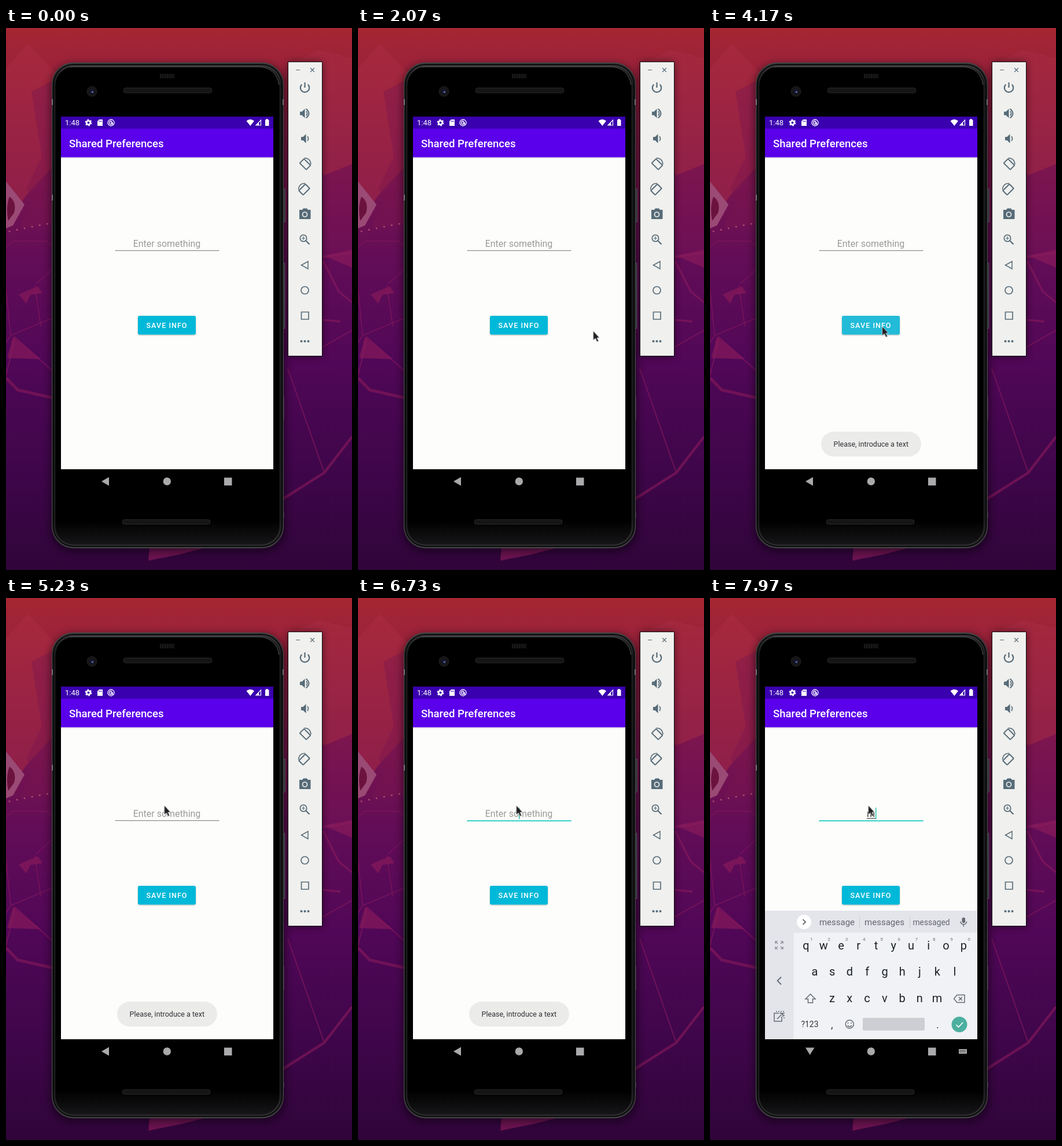
Write an HTML page that moves like this. It is 598 px wide and 936 px high and loops after 8 s.

```html
<!DOCTYPE html>
<html lang="en">
<head>
<meta charset="utf-8">
<title>Shared Preferences demo</title>
<style>
  html, body { margin: 0; width: 100%; height: 100%; overflow: hidden; background: #4e0a55; }
  svg { display: block; width: 100vw; height: 100vh; font-family: Roboto, sans-serif; }
  .mid { text-anchor: middle; }
  .line { fill: none; stroke: #8a1a5c; stroke-width: 2; opacity: .6; }
  .tools { fill: none; stroke: #566b78; stroke-width: 1.7; }
  .tools .solid { fill: #566b78; stroke: none; }
  .keys { font-size: 20px; fill: #1d2126; }
  .keys .digit { font-size: 8px; fill: #6c7078; }

  /* Every part shares one 8 s clock. */
  .clock { animation: 8s linear infinite both; }
  #pointer { animation-name: pointer; }
  #button { animation-name: button; }
  #ripple { animation-name: ripple; }
  #toast { animation-name: toast; }
  #focus { animation-name: focus; transform-origin: 278px 385px; }
  #caret { animation-name: caret; }
  #keyboard { animation-name: keyboard; }
  #hint { animation-name: hint; }
  .typed { animation-name: typed; }
  .idle { animation-name: idle; }
  .open { animation-name: open; }

  @keyframes pointer {
    0%, 20% { transform: translate(606px, 590px); animation-timing-function: ease-out; }
    25%, 28% { transform: translate(406.5px, 523px); animation-timing-function: ease-in-out; }
    36%, 53% { transform: translate(297.5px, 515px); animation-timing-function: ease-in-out; }
    62%, 100% { transform: translate(273.5px, 358px); }
  }
  @keyframes button {
    0%, 33.5% { fill: #00b8d8; }
    35%, 54% { fill: #20bbd8; }
    56%, 100% { fill: #00b8d8; }
  }
  @keyframes ripple {
    0%, 45% { opacity: 0; transform: scale(.1); }
    46% { opacity: .24; transform: scale(.3); }
    48% { opacity: .24; transform: scale(1); }
    51%, 100% { opacity: 0; transform: scale(1); }
  }
  @keyframes toast {
    0%, 47% { opacity: 0; }
    49%, 91% { opacity: 1; }
    93%, 100% { opacity: 0; }
  }
  @keyframes focus {
    0%, 81.5% { opacity: 0; transform: scaleX(.1); }
    83%, 100% { opacity: 1; transform: none; }
  }
  @keyframes caret {
    0% { opacity: 0; transform: none; animation-timing-function: step-end; }
    82% { opacity: 1; transform: none; animation-timing-function: step-end; }
    88.25% { opacity: 0; transform: none; animation-timing-function: step-end; }
    94.5% { opacity: 1; transform: none; animation-timing-function: step-end; }
    97%, 100% { opacity: 1; transform: translateX(8px); }
  }
  @keyframes keyboard {
    0%, 86% { transform: translateY(224px); animation-timing-function: cubic-bezier(0, 0, .2, 1); }
    90%, 100% { transform: none; }
  }
  @keyframes hint { 0%, 96.99% { opacity: 1; } 97%, 100% { opacity: 0; } }
  @keyframes typed { 0%, 96.99% { opacity: 0; } 97%, 100% { opacity: 1; } }
  @keyframes idle { 0%, 86.99% { opacity: 1; } 87%, 100% { opacity: 0; } }
  @keyframes open { 0%, 86.99% { opacity: 0; } 87%, 100% { opacity: 1; } }
</style>
</head>
<body>
<svg viewBox="0 0 598 936">
  <defs>
    <linearGradient id="wall" x2="0" y2="1">
      <stop offset="0" stop-color="#a62632"/>
      <stop offset=".1" stop-color="#98213e"/>
      <stop offset=".25" stop-color="#7e164c"/>
      <stop offset=".42" stop-color="#630d57"/>
      <stop offset=".62" stop-color="#500757"/>
      <stop offset=".8" stop-color="#40064b"/>
      <stop offset="1" stop-color="#30053a"/>
    </linearGradient>
    <linearGradient id="shell" x2="0" y2="1">
      <stop offset="0" stop-color="#3a3a3c"/>
      <stop offset=".05" stop-color="#191a1b"/>
      <stop offset=".94" stop-color="#191a1b"/>
      <stop offset="1" stop-color="#38383a"/>
    </linearGradient>
    <linearGradient id="glass" x2="0" y2="1">
      <stop offset=".95" stop-color="#000"/>
      <stop offset="1" stop-color="#161618"/>
    </linearGradient>
    <filter id="soft" x="-20%" y="-20%" width="140%" height="140%"><feGaussianBlur stdDeviation="7"/></filter>
    <filter id="lift" x="-10%" y="-10%" width="120%" height="140%">
      <feDropShadow dx="0" dy="1" stdDeviation=".9" flood-opacity=".3"/>
    </filter>
    <clipPath id="screen"><path d="M95 153h367v609H95z"/></clipPath>
    <clipPath id="buttonClip"><rect x="228" y="497" width="100" height="33" rx="3"/></clipPath>
  </defs>

  <!-- Wallpaper -->
  <path fill="url(#wall)" d="M0 0h598v936H0z"/>
  <path fill="#ac2c42" opacity=".5" d="M0 70 38 27 90 82V230L34 290 0 344z"/>
  <path fill="#78164f" opacity=".4" d="M44 110 90 86V338L22 346 44 302 36 276 62 222z"/>
  <path fill="#9a4a75" d="M0 265 32 305 12 341 0 346z"/>
  <path fill="#6b123f" d="M6 291q13 10 8 28L4 333Q-1 310 6 291z"/>
  <path fill="#a82c45" opacity=".5" d="M487 64 540 38 598 52V235L549 255 520 160z"/>
  <path fill="#7c1454" opacity=".35" d="M549 255 598 235V385L548 395z"/>
  <path fill="none" stroke="#a8456f" stroke-width="3.2" stroke-linecap="round" stroke-dasharray="0 13.3" d="M6 351 72 338"/>
  <g class="line">
    <path stroke-width="1.6" d="M0 378 12 368H70L82 379M0 452 8 531 82 500M8 531 0 544M50 445 60 515M82 415 52 442"/>
    <path stroke-width="5" d="M0 604 20 625 82 639"/>
    <path d="M0 600 16 534 82 594M487 588 550 768M520 566 598 522"/>
    <path d="M598 706 550 768 479 813" stroke-width="4.500"/>
    <path d="M548 396 598 388M548 402 575 455 598 474M548 504 578 507" stroke-width="3.500"/>
  </g>
  <path fill="#8a1b5b" opacity=".65" d="M22 460 55 446 63 458 42 461 35 476zM12 533 60 572 2 570zM248 898H344L300 909 246 920zM549 393 598 383V414z"/>

  <!-- Phone -->
  <rect x="77" y="62" width="406" height="842" rx="38" opacity=".5" filter="url(#soft)"/>
  <g fill="#37343a" stroke="#68636c" stroke-width=".8">
    <path d="M477 278h5.500v57H477zM477 406h5v113H477zM476 636h4v40h-4zM476 837h4v8h-4z"/>
  </g>
  <rect x="79.500" y="60" width="400" height="838" rx="37" fill="url(#shell)" stroke="#4b4c4c"/>
  <rect x="82" y="63" width="395" height="832" rx="35" fill="none" stroke="#0c0c0d" stroke-width="2"/>
  <rect x="85" y="67" width="388" height="825" rx="32" fill="url(#glass)" stroke="#1c1c1e"/>
  <path d="M110 67H440Q467 70 472 98" fill="none" stroke="#5c5d60"/>
  <path d="M80 123v10M80 288v10M479 123v10" stroke="#77787a" stroke-width="2"/>
  <path d="M266 83h25" stroke="#1d1d1d" stroke-width="8" stroke-dasharray="2 1"/>
  <g fill="#151515" stroke="#28282a">
    <rect x="203" y="103.500" width="153" height="8.500" rx="4"/>
    <rect x="201" y="849" width="152" height="8" rx="4"/>
  </g>
  <circle cx="148.500" cy="109.500" r="8.500" fill="#151517" stroke="#222225"/>
  <circle cx="148.500" cy="109.500" r="4" fill="#15172e"/>
  <circle cx="149.500" cy="110.500" r="1.600" fill="#6871b5"/>

  <!-- App -->
  <g clip-path="url(#screen)">
    <path fill="#fdfdfb" d="M95 153h367v609H95z"/>
    <path fill="#5a00ea" d="M95 174h367v49.500H95z"/>
    <path fill="#3a00af" d="M95 153h367v21H95z"/>
    <path fill="#d9d6e1" d="M95 223.500h367v1.500H95z"/>
    <g fill="#fff">
      <text x="102" y="168" font-size="13">1:48</text>
      <circle cx="142.500" cy="163.500" r="3.300" fill="none" stroke="#fff" stroke-width="2.600"/>
      <circle cx="142.500" cy="163.500" r="5" fill="none" stroke="#fff" stroke-width="2" stroke-dasharray="2.600 2.636"/>
      <path d="M161 158h6v11h-9v-8z"/>
      <path d="M161 160v2m2-2v2m2-2v2" stroke="#3a00af"/>
      <circle cx="181.500" cy="163.500" r="5.500" fill="none" stroke="#fff" stroke-width="1.300"/>
      <path d="M184.500 164A3 3 0 1 1 181.500 160.500L184.500 164M181 163l4 4" fill="none" stroke="#fff" stroke-width="1.300"/>
      <path d="M415.500 160.500Q422 155 429 160.500L422.300 169z"/>
      <path d="M432 168h8.500v-9z" fill="none" stroke="#fff" stroke-width="1.200"/>
      <path d="M433 168h4v-5z"/>
      <path d="M448 158.500h1.500v-1.500h3v1.500h2V169H448z"/>
      <text x="109" y="206" font-size="18.600" font-weight="500">Shared Preferences</text>
    </g>

    <text id="hint" class="mid clock" x="278" y="378" font-size="16" fill="#9a9a98">Enter something</text>
    <path d="M188.500 384.500H368.500" stroke="#7a7a7c"/>
    <path id="focus" class="clock" d="M188.500 384.700H368.500" stroke="#2dd2c6" stroke-width="2"/>
    <g class="typed clock">
      <text class="mid" x="278" y="378" font-size="16" fill="#222">m</text>
      <path d="M271 380.500h15" stroke="#333"/>
    </g>
    <path id="caret" class="clock" d="M278.700 362v20" stroke="#2dbfb4" stroke-width="1.500"/>

    <rect id="button" class="clock" x="228" y="497" width="100" height="32.500" rx="3" filter="url(#lift)"/>
    <g clip-path="url(#buttonClip)"><g transform="translate(298 515)"><circle id="ripple" class="clock" r="74" fill="#fff"/></g></g>
    <text x="242.500" y="518" font-size="12.600" font-weight="500" letter-spacing="1" fill="#fff">SAVE INFO</text>

    <g id="keyboard" class="clock">
      <path fill="#e4e5eb" d="M95 540h367v222H95z"/>
      <path fill="#f0f2f5" d="M144.500 578H462v184H144.500z"/>
      <circle cx="162.500" cy="559.500" r="12.500" fill="#fff"/>
      <path d="m160.500 555 4.500 4.500-4.500 4.500" fill="none" stroke="#4d5359" stroke-width="1.700"/>
      <g class="typed clock mid" fill="#63676d" font-size="15">
        <text x="219.500" y="565">message</text>
        <text x="301.500" y="565">messages</text>
        <text x="382.500" y="565" font-size="13.800">messaged</text>
        <path d="M258.500 549v21M345.500 549v21" stroke="#cbccd2"/>
      </g>
      <g fill="none" stroke="#646a72" stroke-width="1.500">
        <rect x="436.300" y="552.500" width="4" height="8" rx="2" fill="#646a72"/>
        <path d="M433 558.500a5.300 5.300 0 0 0 10.600 0M438.300 564v3.500"/>
        <path d="M113 597v-4h4m5 0h4v4m0 5v4h-4m-5 0h-4v-4m0-9 4 4m9-4-4 4m4 9-4-4m-9 4 4-4" stroke="#81878f" stroke-width="1.200"/>
        <path d="m123 654.500-6.500 6.500 6.500 6.500" stroke-width="1.800"/>
        <path d="M119 717h-8v14h13v-8M116 727l10-10m-6 0h6v6"/>
        <path d="M114 714h14v12" stroke-dasharray="2 2"/>
        <path d="m173.500 684-8.500 8.500h4.500v6.500h8v-6.500h4.500z"/>
        <path d="M427 685.500h13v13h-13l-5.500-6.500zM430 689l6 6m0-6-6 6"/>
        <circle cx="241.300" cy="736" r="7"/>
        <path d="M237.500 738q3.800 4.500 7.600 0"/>
        <path d="M238.500 733v2m5.500-2v2"/>
      </g>
      <g id="keys" class="keys mid"></g>
      <text x="157.500" y="741" font-size="13.900" fill="#30343a">?123</text>
      <text x="209" y="743" font-size="18" fill="#30343a">,</text>
      <text x="391" y="743" font-size="18" fill="#30343a">.</text>
      <rect x="264" y="725" width="107" height="22" rx="2" fill="#cdced4"/>
      <circle cx="431" cy="736.500" r="13.500" fill="#4caf9f"/>
      <path d="m425.500 737 4 4 7.500-8" fill="none" stroke="#fff" stroke-width="1.700"/>
    </g>

    <g id="toast" class="clock">
      <rect x="192" y="697" width="173" height="43" rx="21.500" fill="#ebebea"/>
      <text class="mid" x="278.300" y="723.300" font-size="12.500" fill="#303034">Please, introduce a text</text>
    </g>
  </g>

  <!-- Navigation -->
  <g fill="#aaa9ab">
    <path class="idle clock" d="M165 783 178 775.500v15z"/>
    <path class="open clock" d="M165 776.500h15.500L172.700 789z"/>
    <circle cx="278.300" cy="783" r="6.700"/>
    <path d="M377 776.500h13.500V790H377z"/>
    <g class="open clock">
      <path d="M430 779h14v8h-14z"/>
      <path d="M431.500 781.500h11m-11 2.300h11" stroke="#000" stroke-dasharray="1.200 1"/>
    </g>
  </g>

  <!-- Emulator controls -->
  <path d="M487.500 59h59v508h-59z" opacity=".55" filter="url(#soft)"/>
  <path fill="#f0f0ee" stroke="#0e0d12" d="M487.500 58.500h59v508h-59z"/>
  <g class="tools">
    <path d="M501 72.500h7M526 69l7 7m0-7-7 7" stroke-width="1.200"/>
    <path d="M516.500 94v9M511.300 97.500a7.700 7.700 0 1 0 10.400 0" stroke-width="2.200"/>
    <g id="speaker">
      <path class="solid" d="M508 144.500h3.500l5-5v16l-5-5H508z"/>
      <path d="M519 143.500q3 4 0 8"/>
    </g>
    <path d="M518.500 139.500q10 8 0 16" stroke-width="2"/>
    <use href="#speaker" x="2" y="43.500"/>
    <g id="rotate">
      <rect x="509" y="230" width="16" height="10.500" rx="1" transform="rotate(45 517 235.250)" stroke-width="2"/>
      <path d="M515.500 224.500q10.500 0 11.500 11" stroke-width="1.600"/>
    </g>
    <use href="#rotate" transform="translate(1032.500 43.700) scale(-1 1)"/>
    <path class="solid" d="M507 314h5l2-2.500h6l2 2.500h4.500v16H507z"/>
    <circle cx="516.500" cy="322" r="4" fill="#566b78" stroke="#f0f0ee"/>
    <circle cx="514" cy="363" r="5.700"/>
    <path d="m518.500 367.500 6 6" stroke-width="2.200"/>
    <path d="M511 363h6m-3-3v6" stroke-width="1.200"/>
    <path d="m510.500 409.500 11.500-6.500v13z" stroke-width="1.500"/>
    <circle cx="516.500" cy="453" r="6.500"/>
    <path d="M510.500 490.500h12.500V503h-12.500z"/>
    <g class="solid"><circle cx="510.500" cy="541" r="2"/><circle cx="516.500" cy="541" r="2"/><circle cx="522.500" cy="541" r="2"/></g>
  </g>

  <path id="pointer" class="clock" d="M0 0V16.500L3.800 13 6.500 19 9.300 17.800 6.700 12H11z" fill="#202023" stroke="#f4f4f4" stroke-width=".8"/>
</svg>
<script>
  const rows = [
    { letters: "qwertyuiop", x: 166, y: 607 },
    { letters: "asdfghjkl", x: 181, y: 652 },
    { letters: "zxcvbnm", x: 211, y: 698 }
  ];
  const pitch = 30.25;
  const label = (text, x, y, cls = "") => `<text x="${x}" y="${y}" class="${cls}">${text}</text>`;

  document.getElementById("keys").innerHTML = rows.map((row, r) =>
    [...row.letters].map((letter, i) => {
      const x = row.x + i * pitch;
      const digit = r ? "" : label((i + 1) % 10, x + 9.5, 592, "digit");
      return label(letter, x, row.y) + digit;
    }).join("")
  ).join("");
</script>
</body>
</html>
```
